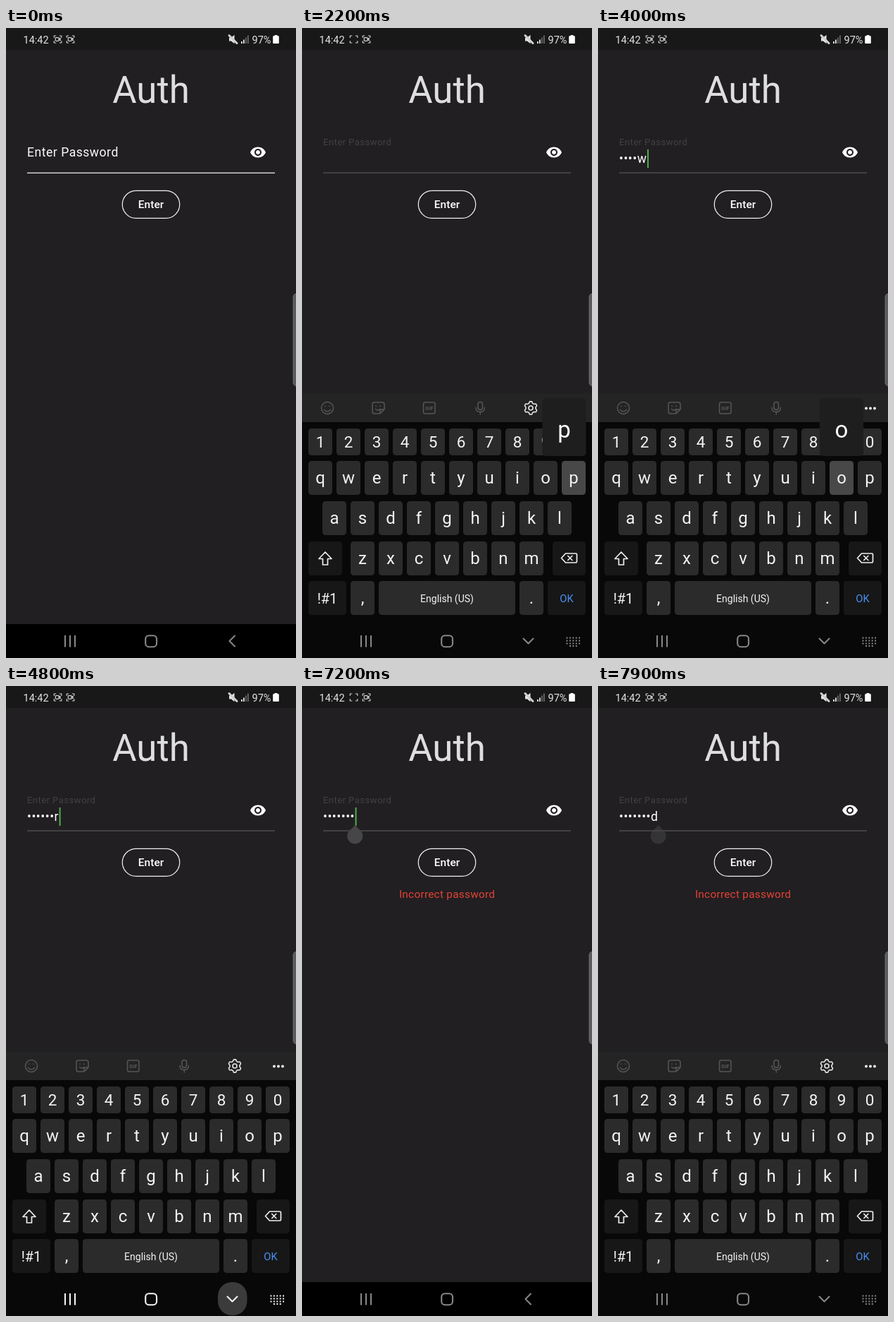
Animation of 412x892 px, one loop 8000 ms. Source, as an HTML page:

```html
<!DOCTYPE html>
<html lang="en">
<head>
<meta charset="utf-8">
<title>Auth</title>
<style>
  html, body { margin: 0; width: 100%; height: 100%; overflow: hidden; background: #211f22; }
  svg { display: block; width: 412px; height: 892px; font-family: Roboto, sans-serif; fill: #fff; }
  .mid { text-anchor: middle; }
  .line { fill: none; stroke: currentColor; stroke-linecap: round; stroke-linejoin: round; }
  .dim { color: #565656; }
  .field { font-size: 17.6px; letter-spacing: .5px; }
  .key { fill: #2b2b2b; }
  .dark { fill: #171717; }
  .key.down { fill: #484848; }
</style>
</head>
<body>
<svg viewBox="0 0 412 892">
  <defs>
    <clipPath id="aboveNav"><rect width="412" height="844"/></clipPath>
    <path id="corners" class="line" stroke-width="1.2" d="M0 3V.5H2.5M8 .5H10.5V3M10.5 8V10.5H8M2.5 10.5H0V8"/>
    <g id="camera" class="line" stroke-width="1.2"><rect x="2" y="3.2" width="4.8" height="4.6" rx=".8"/><path d="M7 5 8.8 3.8V7.2L7 6"/></g>
  </defs>
  <rect width="412" height="892" fill="#211f22"/>

  <rect width="412" height="31" fill="#181818"/>
  <g fill="#e4e4e4" color="#d0d0d0" font-size="14.5">
    <text x="24.5" y="21.5">14:42</text>
    <use href="#corners" x="68.3" y="10.5"/><use id="blinkCam" href="#camera" x="68.3" y="10.5"/>
    <use href="#corners" x="86.3" y="10.5"/><use href="#camera" x="86.3" y="10.5"/>
    <path d="M317 13.5h3l4.5-3.8v12.6l-4.5-3.8h-3z"/>
    <path class="line" stroke="#181818" stroke-width="3" d="M317 10.5 328 21.5"/>
    <path class="line" stroke-width="1.4" d="M317 10.5 328 21.5"/>
    <path d="M334 19h1.8v3H334zM337 16.5h1.8V22H337z"/>
    <path fill="#666" d="M340 13.5h1.8V22H340zM343 10.5h1.8V22H343z"/>
    <text x="349.5" y="21.5">97%</text>
    <path fill="#fff" d="M381.5 10h4v1.3h1.5q.8 0 .8.8v9.200q0 .8-.8.8h-7q-.8 0-.8-.8v-9.200q0-.8.8-.8h1.500z"/>
  </g>

  <text class="mid" x="206" y="106" font-size="52.8" fill="#dedede">Auth</text>
  <text id="label" class="field">Enter Password</text>
  <text id="value" class="field" x="30" y="190.500"></text>
  <rect id="underline" x="30" width="352"/>
  <path transform="translate(346 164)" d="M12 4.500C7 4.500 2.730 7.610 1 12c1.730 4.390 6 7.500 11 7.500s9.270-3.110 11-7.500c-1.730-4.390-6-7.500-11-7.500zM12 17c-2.760 0-5-2.240-5-5s2.240-5 5-5 5 2.240 5 5-2.240 5-5 5zm0-8c-1.660 0-3 1.340-3 3s1.340 3 3 3 3-1.340 3-3-1.340-3-3-3z"/>
  <rect id="cursor" y="172" width="2" height="26" fill="#4caf50"/>
  <path id="handle" fill="#464547" d="M0-15.500 7.800-7.800A11 11 0 1 1-7.800-7.800Z"/>
  <rect id="ripple" x="165" y="230" width="82" height="39.500" rx="19.700"/>
  <rect x="165.300" y="230.300" width="81.400" height="39" rx="19.500" fill="none" stroke="#f0f0f0" stroke-width="1.200"/>
  <text class="mid" x="206" y="255" font-size="15.400" font-weight="500" letter-spacing=".1">Enter</text>
  <text id="error" class="mid" x="206.100" y="299.500" font-size="15.400" letter-spacing=".25" fill="#e54335">Incorrect password</text>

  <rect x="408" y="376" width="12" height="131" rx="5" fill="#5b5a5c" stroke="#777" stroke-width=".8"/>

  <g clip-path="url(#aboveNav)"><g id="keyboard">
    <rect y="518" width="412" height="374" fill="#080808"/>
    <rect y="518" width="412" height="40" fill="#242424"/>
    <g class="line dim" stroke-width="1.500">
      <circle cx="36" cy="538" r="8.500"/><path d="M31.500 540.500Q36 545.500 40.500 540.500M33 535v.6M39 535v.6"/>
      <path d="M103 530h11q3 0 3 3v7l-6 6h-8q-3 0-3-3v-10q0-3 3-3zM117 540h-3q-3 0-3 3v3M105 535v.6M111 535v.6M104.500 539.500q3.500 3.500 6.500 0"/>
      <rect x="172.500" y="530" width="16.500" height="16" rx="2.500"/>
      <rect x="250" y="529.500" width="6.500" height="11" rx="3.200"/><path d="M247 537.500q0 6 6.200 6t6.200-6M253.200 543.500v3.500"/>
    </g>
    <text class="mid" x="180.800" y="540.700" font-size="7.500" font-weight="700" fill="#565656">GIF</text>
    <g class="line" color="#e8e8e8" stroke-width="1.600"><path id="gear"/><circle cx="325" cy="538" r="3"/></g>
    <path class="line" color="#eee" stroke-width="4" d="M381 538.500h0M387 538.500h0M393 538.500h0"/>
    <g id="keys"></g>
    <g class="line" color="#f0f0f0" stroke-width="1.700">
      <path d="M33 742 42 751.500H36.500V760H29.500V751.500H24Z"/>
      <path d="M374.500 744H389q1.500 0 1.500 1.500v10q0 1.500-1.500 1.500H374.500L368.500 750.500ZM377.800 747.500l6 6M383.800 747.500l-6 6"/>
    </g>
    <g id="popup"><rect width="62" height="82" rx="5" fill="#1e1e1e"/><text class="mid" x="31" y="56" font-size="33"></text></g>
  </g></g>

  <rect id="navBar" y="844" width="412" height="48"/>
  <rect id="navPress" x="301" y="844" width="41.500" height="47" rx="20" fill="#3b3b3b"/>
  <g id="nav" class="line" stroke-width="2.100">
    <path stroke-linecap="butt" d="M84 860v16.500M91 860v16.500M98 860v16.500"/>
    <rect x="198.200" y="860.200" width="15.800" height="16" rx="4.800"/>
    <path id="back" d="M325 860.500 317.500 868 325 875.500"/>
    <g id="down"><path d="M314.500 864.500 321.500 871.500 328.500 864.500"/>
      <path stroke-linecap="butt" stroke-width="2" stroke-dasharray="2 2.400" d="M375.500 863.500h20M375.500 867.500h20M375.500 871.500h20M380 875h11"/></g>
  </g>
</svg>
<script>
const LOOP = 8000, STEP = 100;
const WORD = 'password';
const typedAt = [2400, 2700, 3000, 3200, 3600, 4100, 4500, 7900];
const pressedAt = [2200, 2600, 2900, 3100, 3500, 4000, 4400, 7800];
const blinkStarts = [700, ...typedAt, 7100];

const $ = id => document.getElementById(id);
const set = (el, attrs) => Object.entries(attrs).forEach(([k, v]) => el.setAttribute(k, v));
const show = (el, on) => { el.style.display = on ? '' : 'none'; };
const between = (t, a, b) => t >= a && t < b;
const ramp = (t, a, b) => {
  const p = Math.min(1, Math.max(0, (t - a) / (b - a)));
  return p * p * (3 - 2 * p);
};
const mix = (a, b, p) => a + (b - a) * p;

const keyInfo = {};
function addKey(name, x, y, w = 34, h = 48, { size = 24, dark, fill = '#f4f4f4', drop = 8 } = {}) {
  const cx = x + w / 2;
  $('keys').insertAdjacentHTML('beforeend',
    `<rect class="key${dark ? ' dark' : ''}" x="${x}" y="${y}" width="${w}" height="${h}" rx="4.5"/>` +
    `<text class="mid" x="${cx}" y="${y + h / 2 + drop}" font-size="${size}" fill="${fill}">${name}</text>`);
  keyInfo[name] = { cx, y, rect: $('keys').lastElementChild.previousElementSibling };
}
const addRow = (names, x, y, h, style) => [...names].forEach((n, i) => addKey(n, x + 40 * i, y, 34, h, style));

addRow('1234567890', 9, 567, 38, { size: 22.5 });
addRow('qwertyuiop', 9, 613);
addRow('asdfghjkl', 29, 670);
addRow('zxcvbnm', 69, 727);
addKey('', 9, 727, 48, 48, { dark: true });
addKey('', 356, 727, 47, 48, { dark: true });
addKey('!#1', 9, 783, 54, 48, { dark: true, size: 20 });
addKey(',', 69, 783);
addKey('English (US)', 109, 783, 194, 48, { size: 14, drop: 6 });
addKey('.', 309, 783);
addKey('OK', 349, 783, 54, 48, { dark: true, size: 14.7, fill: '#4a90f5', drop: 6 });

const gearPoints = Array.from({ length: 72 }, (_, i) => {
  const a = i * Math.PI / 36, r = 8.1 + 1.1 * Math.tanh(2.5 * Math.cos(6 * a));
  return `${(325 + r * Math.sin(a)).toFixed(1)} ${(538 - r * Math.cos(a)).toFixed(1)}`;
});
$('gear').setAttribute('d', `M${gearPoints.join('L')}Z`);

function drawField(t) {
  const p = t >= 1000 ? 1 : t >= 900 ? .6 : 0;
  const shade = Math.round(mix(250, 66, p));
  const color = `rgb(${shade},${shade - p},${shade})`;
  set($('label'), { transform: `translate(30 ${mix(182, 165.5, p)}) scale(${mix(1, .75, p)})`, fill: color });
  set($('underline'), { y: mix(204.6, 204, p), height: mix(1.2, 2, p), fill: color });

  const count = typedAt.filter(at => at <= t).length;
  const fresh = count && t - typedAt[count - 1] < 1500;
  $('value').textContent = fresh ? '•'.repeat(count - 1) + WORD[count - 1] : '•'.repeat(count);
  const end = 30.5 + (count ? $('value').getComputedTextLength() : 0);

  const since = t - blinkStarts.filter(at => at <= t).pop();
  show($('cursor'), t >= 900 && Math.floor(since / 500) % 2 === 0);
  set($('cursor'), { x: end });
  show($('handle'), t >= 7100);
  set($('handle'), { transform: `translate(${end - .3} 212.5)`, opacity: t >= 7900 ? .55 : 1 });

  set($('ripple'), { opacity: between(t, 5700, 6000) ? mix(.12, 0, (t - 5700) / 300) : 0 });
  show($('error'), t >= 5800);
}

function drawKeyboard(t) {
  const rise = ramp(t, 1300, 1700) - ramp(t, 4800, 5200) + ramp(t, 7200, 7600);
  show($('keyboard'), rise > 0);
  set($('keyboard'), { transform: `translate(0 ${326 * (1 - rise)})` });

  const hit = pressedAt.findIndex((at, i) => between(t, at, typedAt[i]));
  const key = keyInfo[WORD[hit]];
  Object.values(keyInfo).forEach(k => k.rect.classList.toggle('down', k === key));
  show($('popup'), key);
  if (key) {
    set($('popup'), { transform: `translate(${Math.min(key.cx - 31, 341.5)} ${key.y - 89})` });
    $('popup').lastElementChild.textContent = WORD[hit];
  }
}

function drawNav(t) {
  const open = between(t, 1400, 4900) || t >= 7300;
  show($('back'), !open);
  show($('down'), open);
  set($('navBar'), { fill: open ? '#080808' : '#000' });
  $('nav').style.color = between(t, 4700, 7000) ? '#f2f2f2' : '#868686';
  show($('navPress'), between(t, 4700, 5000));
}

function frame(now) {
  const t = Math.floor((now % LOOP) / STEP) * STEP;
  show($('blinkCam'), (t + 300) % 1000 < 500);
  drawField(t);
  drawKeyboard(t);
  drawNav(t);
  requestAnimationFrame(frame);
}
frame(performance.now());
</script>
</body>
</html>
```
